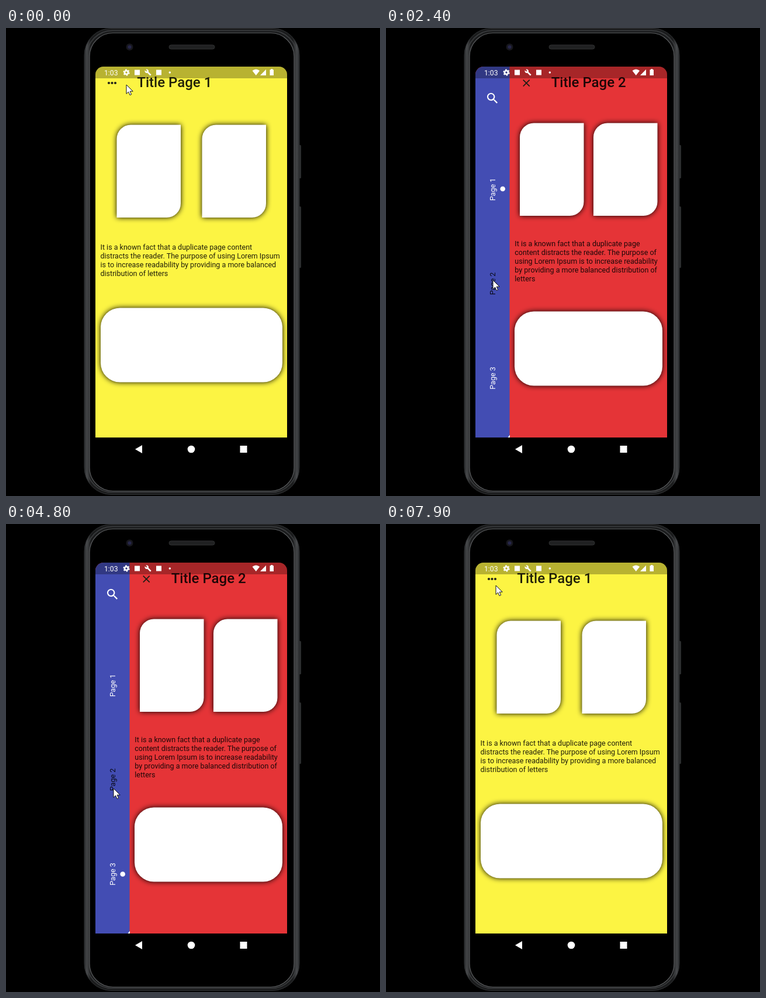
An HTML page that plays this animation: 640x800 px, repeating every 8000 ms.

```html
<!DOCTYPE html>
<html lang="en">
<head>
<meta charset="utf-8">
<title>Sliding side menu</title>
<style>
  html, body { margin: 0; width: 100%; height: 100%; overflow: hidden; background: #000; }
  svg { display: block; width: 100vw; height: 100vh; }
  text { font-family: Roboto, sans-serif; font-size: 12.5px; fill: #000; fill-opacity: .87; }
  .title { font-size: 24px; font-weight: 500; }
  .clock { font-size: 12.2px; fill: #fff; fill-opacity: 1; }
</style>
</head>
<body>
<svg viewBox="0 0 640 800">
  <defs>
    <clipPath id="screen"><path d="M153 700V80a14 14 0 0 1 14-14H467a14 14 0 0 1 14 14V700z"/></clipPath>
    <filter id="blur" x="-30%" y="-30%" width="160%" height="160%"><feGaussianBlur stdDeviation="5"/></filter>
    <linearGradient id="rim">
      <stop offset="0" stop-color="#242628"/><stop offset=".012" stop-color="#4a4c4e"/>
      <stop offset=".03" stop-color="#1b1c1d"/><stop offset=".97" stop-color="#1b1c1d"/>
      <stop offset=".988" stop-color="#4a4c4e"/><stop offset="1" stop-color="#242628"/>
    </linearGradient>
  </defs>
  <rect width="640" height="800"/>

  <!-- phone body -->
  <g fill="#2b2d2e">
    <rect x="500" y="200" width="5" height="57" rx="1.5"/>
    <rect x="500" y="305" width="5" height="105" rx="1.5"/>
  </g>
  <rect x="134" y="0.5" width="368" height="797" rx="46" fill="url(#rim)" stroke="#303234"/>
  <rect x="138.5" y="4.5" width="359" height="789" rx="43" fill="none" stroke="#3d3f41" stroke-width="1.5"/>
  <rect x="143" y="8.5" width="350" height="783" rx="40" stroke="#5a5c5e" stroke-width="1.2"/>
  <circle cx="211.500" cy="32.500" r="6" fill="#17171d"/>
  <circle cx="211.500" cy="32.500" r="3" fill="#26264a"/>
  <rect x="279" y="29" width="78" height="7" rx="3.500" fill="#202122" stroke="#303132"/>

  <g clip-path="url(#screen)">
    <rect id="page" x="153" y="66" width="328" height="634"/>
    <g id="cards"></g>
    <g id="copy"></g>
    <text id="title" class="title" y="100.5"></text>
    <g id="more" fill="#222218">
      <circle cx="176" cy="94" r="2.100"/><circle cx="181.500" cy="94" r="2.100"/><circle cx="187" cy="94" r="2.100"/>
    </g>
    <g id="menu">
      <path d="M234.700 88.700l11 11m0-11l-11 11" stroke="#1c1c14" stroke-width="1.700"/>
      <path d="M208 696h4v4h-4z" fill="#fff"/>
      <path d="M153 66h58.500v630l-3 4H153z" fill="#434db3"/>
      <path transform="translate(169.900 107.800) scale(1.030)" fill="#fff" d="M15.500 14h-.79l-.28-.27C15.410 12.590 16 11.110 16 9.500 16 5.910 13.090 3 9.500 3S3 5.910 3 9.500 5.910 16 9.500 16c1.610 0 3.090-.59 4.230-1.570l.27.280v.79l5 4.990L20.490 19l-4.990-5zm-6 0C7.010 14 5 11.990 5 9.500S7.010 5 9.500 5 14 7.010 14 9.500 11.990 14 9.500 14z"/>
      <g id="labels"></g>
      <circle id="dot" cx="199.700" r="4.300" fill="#fff"/>
    </g>

    <!-- status bar -->
    <rect x="153" y="66" width="328" height="20" fill-opacity=".27"/>
    <text class="clock" x="168" y="80.500">1:03</text>
    <g fill="#fff">
      <g fill="none" stroke="#fff">
        <circle cx="206" cy="76" r="3" stroke-width="2.700"/>
        <circle cx="206" cy="76" r="4.800" stroke-width="1.800" stroke-dasharray="2.600 2.427"/>
      </g>
      <rect x="220" y="71.500" width="9" height="9"/>
      <path transform="translate(237 70) scale(.5)" d="M22.700 19l-9.100-9.100c.9-2.300.4-5-1.500-6.900-2-2-5-2.400-7.400-1.300L9 6 6 9 1.600 4.700C.4 7.100.9 10.100 2.900 12.100c1.900 1.900 4.600 2.400 6.900 1.500l9.100 9.100c.4.4 1 .4 1.400 0l2.300-2.300c.5-.4.5-1.100.1-1.400z"/>
      <rect x="257" y="71.500" width="9" height="9"/>
      <circle cx="280.300" cy="76" r="1.800"/>
      <path d="M421.500 73q6.300-5 12.600 0L427.800 81z"/>
      <path d="M445 70.800V81H435z"/>
      <path d="M453.300 70h3v1.300h1.700V81h-6.500v-9.700h1.800z"/>
    </g>
  </g>

  <g fill="#fff">
    <path d="M233 713v14l-12-7z"/>
    <circle cx="317" cy="720" r="6.300"/>
    <rect x="400.500" y="714" width="12" height="12"/>
  </g>
  <path id="cursor" d="M0 0v15.500l3.600-3.400 2.400 5.600 2.600-1.100-2.400-5.400h5z" fill="#fff" stroke="#111" stroke-width="1"/>
</svg>

<script>
const $ = id => document.getElementById(id);
const START = performance.now(), LOOP = 8000, STEP = 100;

const COLORS = ['#fcf443', '#e53437', '#76ffb1'];
const STOPS = [276, 437, 598.5];
const DOT_TIME = 500;

// selection changes: time, page, where the dot sets off
const PICKS = [[0, 0, 89], [1000, 0, 89], [2400, 1, 275], [3700, 2, 437], [4800, 1, 598.5], [5900, 0, 437]];
const OPEN = 1000, CLOSE = 7300;

// pointer stops: time, x, y
const POINTER = [
  [0, 206, 97], [200, 185, 90], [1200, 185, 90], [2200, 183, 431], [2600, 183, 431],
  [3000, 186, 604], [3200, 186, 604], [3400, 184, 614], [3800, 184, 614], [4200, 198, 421],
  [4300, 198, 421], [4450, 203, 434], [4600, 184, 452], [4900, 184, 452], [5500, 184, 275.5],
  [6000, 184, 275.5], [6600, 229, 92.5], [7100, 238, 92], [7400, 238, 92], [7900, 188, 105]
];

const LAYOUTS = {
  closed: {
    title: 224.3, x: 161.5, base: 379, top: 165.5, cards: [189.5, 335.5], wide: [162, 478.5, 311],
    lines: ['It is a known fact that a duplicate page content',
      'distracts the reader. The purpose of using Lorem Ipsum',
      'is to increase readability by providing a more balanced',
      'distribution of letters']
  },
  open: {
    title: 282.7, x: 220.3, base: 373, top: 162.5, cards: [229, 355], wide: [220, 484.5, 253],
    lines: ['It is a known fact that a duplicate page',
      'content distracts the reader. The purpose of',
      'using Lorem Ipsum is to increase readability',
      'by providing a more balanced distribution of',
      'letters']
  }
};

const ease = k => k * k * (3 - 2 * k);
const clamp = k => Math.max(0, Math.min(1, k));
const mix = (a, b, k) => a + (b - a) * k;

const raised = shape => `<g filter="url(#blur)">${shape}</g><g fill="#fff">${shape}</g>`;
const leaf = (x, y) =>
  `<path d="M${x} ${y + 158.5}v-134.5a24 24 0 0 1 24-24h85.5v134.5a24 24 0 0 1-24 24z"/>`;
const pill = (x, y, w) => `<rect x="${x}" y="${y}" width="${w}" height="127" rx="33"/>`;

function setLayout(name) {
  const l = LAYOUTS[name], isOpen = name === 'open';
  $('cards').innerHTML = l.cards.map(x => raised(leaf(x, l.top))).join('') + raised(pill(...l.wide));
  $('copy').innerHTML = l.lines.map((s, i) => `<text x="${l.x}" y="${l.base + 15 * i}">${s}</text>`).join('');
  $('title').setAttribute('x', l.title);
  $('menu').style.display = isOpen ? '' : 'none';
  $('more').style.display = isOpen ? 'none' : '';
}

$('labels').innerHTML = STOPS.map((y, i) =>
  `<text transform="translate(187 ${y}) rotate(-90)" text-anchor="middle">Page ${i + 1}</text>`).join('');
const labels = [...$('labels').children];

function setPage(page) {
  $('page').setAttribute('fill', COLORS[page]);
  $('title').textContent = `Title Page ${page + 1}`;
  labels.forEach((el, i) => {
    el.style.fill = i === page ? '#000' : '#fff';
    el.style.fillOpacity = i === page ? .87 : 1;
  });
}

function pointerAt(t) {
  const i = POINTER.findIndex(p => p[0] > t);
  if (i < 0) return POINTER[POINTER.length - 1].slice(1);
  const [a, b] = [POINTER[i - 1], POINTER[i]];
  const k = ease((t - a[0]) / (b[0] - a[0]));
  return [mix(a[1], b[1], k), mix(a[2], b[2], k)];
}

let layout, page;
function draw(t) {
  const [since, pick, from] = PICKS.filter(p => p[0] <= t).pop();
  const next = t >= OPEN && t < CLOSE ? 'open' : 'closed';
  if (next !== layout) setLayout(layout = next);
  if (pick !== page) setPage(page = pick);
  $('dot').setAttribute('cy', mix(from, STOPS[pick], ease(clamp((t - since) / DOT_TIME))));
  $('cursor').setAttribute('transform', `translate(${pointerAt(t)})`);
}

function tick() {
  const t = (performance.now() - START) % LOOP;
  draw(Math.floor(t / STEP) * STEP);
  requestAnimationFrame(tick);
}
tick();
</script>
</body>
</html>
```
